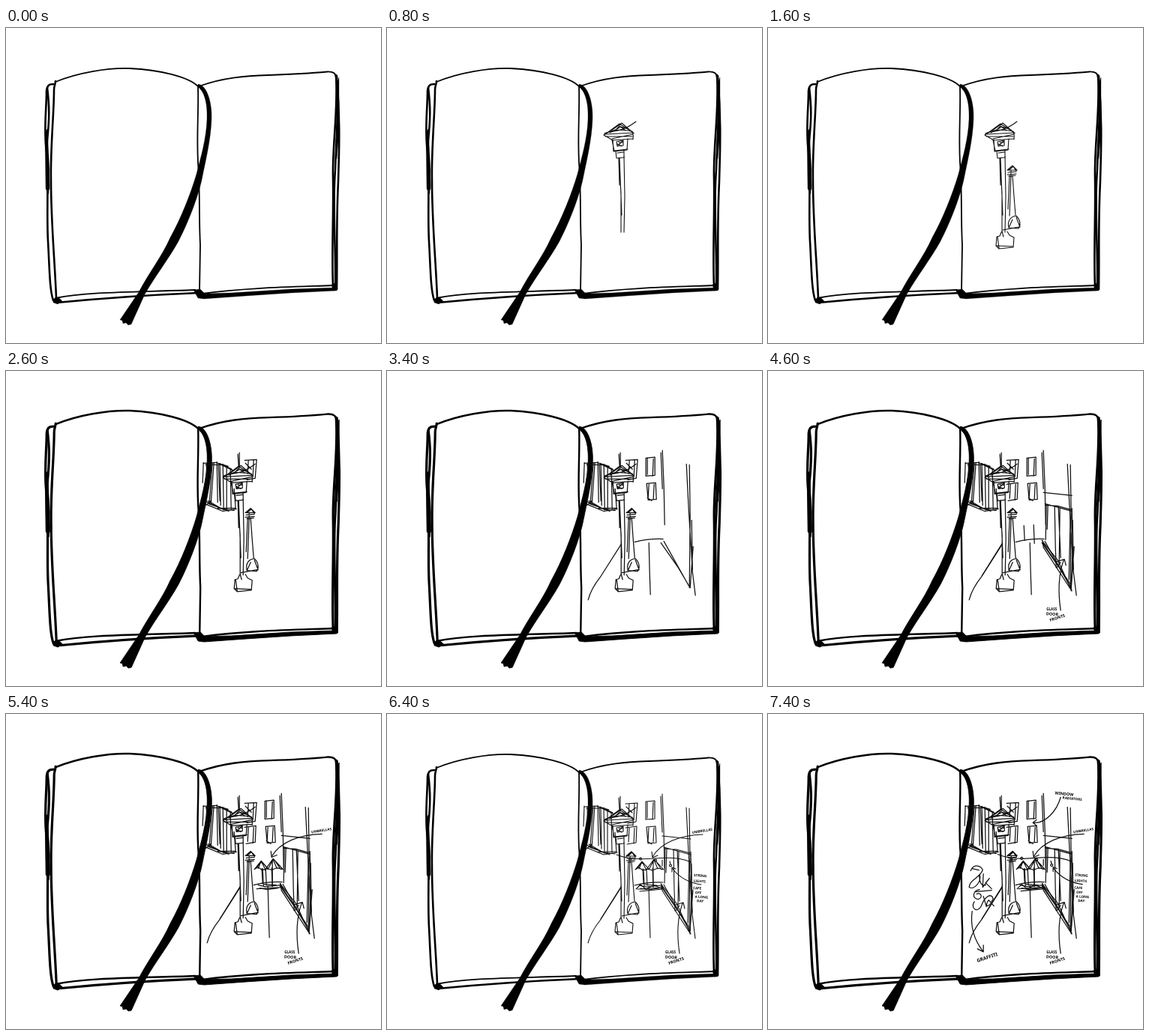
Recreate the animation shown at these times as an HTML page without scripts. Size 500x421 px, loop 7.6 s.

```html
<!DOCTYPE html>
<html lang="en">
<head>
<meta charset="utf-8">
<title>Sketchbook</title>
<style>
  /* --t counts 200 ms ticks; a stroke shows once --t reaches its --at */
  @property --t { syntax: "<number>"; inherits: true; initial-value: 0; }
  @keyframes tick { from { --t: 0; } to { --t: 38; } }
  /* every second tick is drawn a little heavier and slightly shifted */
  @keyframes boil {
    0% { transform: none; --ink: 0px; }
    50%, 100% { transform: translate(.2px, -1.1px) scale(1, 1.003); --ink: .6px; }
  }

  html, body { margin: 0; width: 100%; height: 100%; overflow: hidden; background: #fff; }
  svg { display: block; width: 100%; height: 100%; animation: tick 7.6s steps(38) infinite; }
  .page { animation: boil .4s step-end infinite; }
  .line { fill: none; stroke: #000; stroke-linecap: round; stroke-linejoin: round; }
  .edge { stroke-width: calc(1.8px + var(--ink)); }
  .cover { stroke-width: calc(2.6px + var(--ink)); }
  .solid { stroke: #000; stroke-width: calc(.3px + var(--ink)); stroke-linejoin: round; }
  .sketch { stroke: #111; stroke-width: calc(1.1px + var(--ink) / 4); }
  .sketch > * { opacity: clamp(0, var(--t) - var(--at) + 1, 1); }
  text { fill: #000; stroke: none; font: 700 4.6px "Noto Sans", sans-serif; }
  .big { font-size: 5.4px; }
</style>
</head>
<body>
<svg viewBox="0 0 500 421" preserveAspectRatio="none">
  <g class="page">
    <!-- page edges -->
    <g class="line edge">
      <path d="M66 72C95 60 135 53 165 54C205 56 243 65 256 78"/>
      <path d="M257 78C290 66 320 64 350 63C380 62 402 61 428 58.500C437 58 440 61 440 67"/>
      <path d="M256 78C257 115 254 140 256 180C259 220 257 250 259 290L258 352"/>
      <path d="M436 344C385 346 320 347 262 355"/>
      <path d="M66 361C110 352 180 353 252 350"/>
    </g>
    <!-- covers -->
    <g class="line cover">
      <path d="M66 71C66 75 64 77 64 83C64 115 59 160 60 205C60 260 65 310 67 361"/>
      <path d="M63 75C57 75 55 77 54 84C54 110 50 135 54 165C57 205 54 250 56 285C58 320 58 350 63 364Q67 368 72 364"/>
      <path d="M55 80C58 105 58 120 55 150C53 180 58 195 57 215"/>
      <path d="M440 63C443 110 435 155 436 200C437 250 434 300 436 345"/>
      <path d="M441 64C446 125 444 165 443 205C440 265 442 300 441 349"/>
      <path d="M441 70C444 110 440 150 439 190C435 235 440 290 439 345"/>
      <path d="M68 367C120 362 185 357 257 354"/>
    </g>
    <g class="solid">
      <path d="M52 140L55 135L58 190L57 222L53 215ZM441 75L444 66L444 140L441 175ZM434 343L441 340L442 350L436 351ZM63 362L70 360L75 365L69 369L63 367ZM250 350L259 349L265 355L300 354L380 349L440 347L441 351L380 354L320 358L264 362L256 361Z"/>
      <!-- ribbon -->
      <path d="M256 75C268 76 275 100 274 122C273 150 266 178 262 198C257 225 242 262 230 285C216 310 200 330 185 356L167 396L163 397L160 394L156 395L155 391L152 390L177 353C190 328 208 305 219 280C233 255 246 222 254 195C260 172 267 148 268 122C269 100 264 84 256 79Z"/>
    </g>

    <g class="line sketch">
      <!-- tall lamp -->
      <path style="--at:1" d="M295 139L310 128L327 139M299 137L313 127L329 141M304 137L310 131L318 137M297 140L312 132L324 136"/>
      <path style="--at:2" d="M290 141C297 136 310 142 332 125M289 143C300 134 315 136 327 138Q329 144 328 149M289 143L301 150L328 148M292 142L329 140M291 145L327 145M300 148L328 142"/>
      <path style="--at:3" d="M301 149L302 165L320 163L321 148M300 150L303 164L321 162M305 165L306 174L316 173L316 163M307 167L315 166M306 152L315 150L315 157L307 158ZM308 157L314 151M309 153L315 153M307 155L313 158"/>
      <path style="--at:4" d="M309 174L312 220L312 273M310 174L313 250M316 172L317 225L316 273M309 174L310 210"/>
      <path style="--at:5" d="M311 273L309 278L305 279L304 291L308 295L327 293L328 280L322 277L319 272M306 279L308 294M305 291L327 292M312 272L314 279"/>
      <!-- small lamp -->
      <path style="--at:6" d="M319 190L326 184L332 190ZM320 193L331 192M319 196L331 195M321 190L327 185L331 191M321 198L330 197M324 190L324 199"/>
      <path style="--at:7" d="M324 197L322 251M326 197L328 225L330 250M322 197L320 242"/>
      <path style="--at:8" d="M321 267C319 258 323 252 331 251C337 257 337 264 334 268L321 267L326 256M313 270L334 266M331 253L336 266"/>
      <!-- balcony -->
      <path style="--at:9" d="M263 124L280 123L303 134M266 126L289 126L301 132M283 124L296 128"/>
      <path style="--at:10" d="M263 123L262 150M275 123L271 177M277 123L273 179M267 124L268 160"/>
      <path style="--at:11" d="M281 122L282 176M285 124L286 180M289 125L290 183M294 130L294 186M299 132L300 185M283 126L285 174"/>
      <path style="--at:12" d="M266 175L286 184L306 184M267 179L289 188L307 185M270 178L297 188M282 184L304 187M304 158L306 185M269 174L290 186M266 180L273 174"/>
      <!-- windows and far walls -->
      <path style="--at:13" d="M311 110L311 130M309 112L310 128M318 120L334 119L332 144L321 146M323 120L322 138M330 120L329 142M319 124L327 132"/>
      <path style="--at:14" d="M345 117L357 116L357 140L345 141ZM347 117L347 139M355 118L354 141M346 151L358 150L359 172L348 173ZM349 152L348 170M356 152L355 171M347 170L353 174"/>
      <path style="--at:15" d="M367 107L369 155L370 206M365 110L367 158M399 125L402 185L407 265M403 126L404 193L403 290"/>
      <!-- street -->
      <path style="--at:16" d="M312 232L284 276Q272 291 268 306M330 229Q350 224 368 225M349 230L350 270L351 299"/>
      <path style="--at:17" d="M365 230L388 263L404 290L408 235M369 228L402 287M406 200L407 268L411 300"/>
      <!-- shop front -->
      <path style="--at:18" d="M318 152L333 150L332 172L320 174M323 152L322 171M330 152L329 173M367 163L405 167M369 178L405 188M370 180L386 181L404 186"/>
      <path style="--at:19" d="M371 179L370 226M382 181L383 235L384 263M387 182L390 250M389 184L388 258M373 180L372 212"/>
      <path style="--at:20" d="M365 227L386 253L405 294M367 231L403 285M366 227L367 236L404 293M405 184L406 235L404 294"/>
      <path style="--at:21" d="M341 207L342 227M354 206L355 231M312 231L285 274M403 195L401 279"/>
      <path style="--at:22" d="M390 320C387 300 386 276 394 253M385 255L395 252L397 260M390 256L385 263"/>
      <g style="--at:23" transform="translate(371 320)">
        <text>GLASS</text><text class="big" y="6.500" transform="rotate(3)">DOOR</text><text class="big" transform="translate(5 15) rotate(-18)">FRONTS</text>
      </g>
      <!-- umbrellas -->
      <path style="--at:24" d="M331 208L340 197L349 207M331 208L336 205L341 209L349 207M340 197L336 207M340 197L345 207M333 206L341 198L347 205"/>
      <path style="--at:25" d="M345 209L356 194L369 208L361 206L354 209L348 207M356 195L349 208M356 195L361 207M358 196L366 208M355 196L355 231M342 207L343 230M346 207L347 229"/>
      <path style="--at:26" d="M336 229L345 231L367 229M334 234L368 232M338 233L348 235L363 233M344 228L360 229"/>
      <path style="--at:27" d="M421 161C390 162 365 172 354 191M353 184L354 192L361 189"/>
      <text style="--at:27" transform="translate(407 160) rotate(-9)">UMBRELLAS</text>
      <!-- string lights -->
      <path style="--at:28" d="M306 188Q325 196 357 193T405 198M319 190L326 184L331 191"/>
      <path style="--at:29" d="M324 193a1.500 1.500 0 1 0 .1 0M338 192a1.500 1.500 0 1 0 .1 0M358 194a1.500 1.500 0 1 0 .1 0"/>
      <path style="--at:30" d="M367 195L367 203M377 197L378 201a1.500 1.500 0 1 0 .1 0M332 234L338 228L345 234L356 229L368 234L337 237"/>
      <path style="--at:31" d="M419 228C404 226 390 219 380 206M380 211L380 205L385 207"/>
      <g style="--at:31" transform="translate(409 217) rotate(4)">
        <text>STRING</text><text y="7.500">LIGHTS</text>
      </g>
      <g style="--at:32" transform="translate(408 234) rotate(3)">
        <text>CAFE</text><text x="3" y="6">OFF</text><text x="3" y="11.500">A LONG</text><text x="6" y="17">DAY</text>
      </g>
      <!-- window note -->
      <path style="--at:33" d="M390 112C385 130 370 147 354 146M358 142L353 146L358 150"/>
      <g style="--at:34" transform="translate(382 108) rotate(6)">
        <text class="big">WINDOW</text><text x="11" y="5">RADIATORS</text>
      </g>
      <!-- graffiti -->
      <path style="--at:35" d="M270 210C274 200 284 203 286 209C283 219 268 222 268 232C274 236 285 225 282 215C281 224 284 231 290 229M287 214L286 232L295 220L290 226L298 234M272 207L281 209"/>
      <path style="--at:36" d="M282 235C273 236 271 247 280 248C287 246 284 238 278 241M275 251C269 260 279 267 284 257C290 242 298 240 300 247C293 262 288 257 294 249L301 257M276 238L298 236M287 244L291 258"/>
      <path style="--at:37" d="M272 264C269 286 275 303 287 318M279 314L287 318L287 309"/>
      <text style="--at:37;font-size:6.400px" transform="translate(279 332) rotate(-18)">GRAFFITI</text>
    </g>
  </g>
</svg>
</body>
</html>
```
